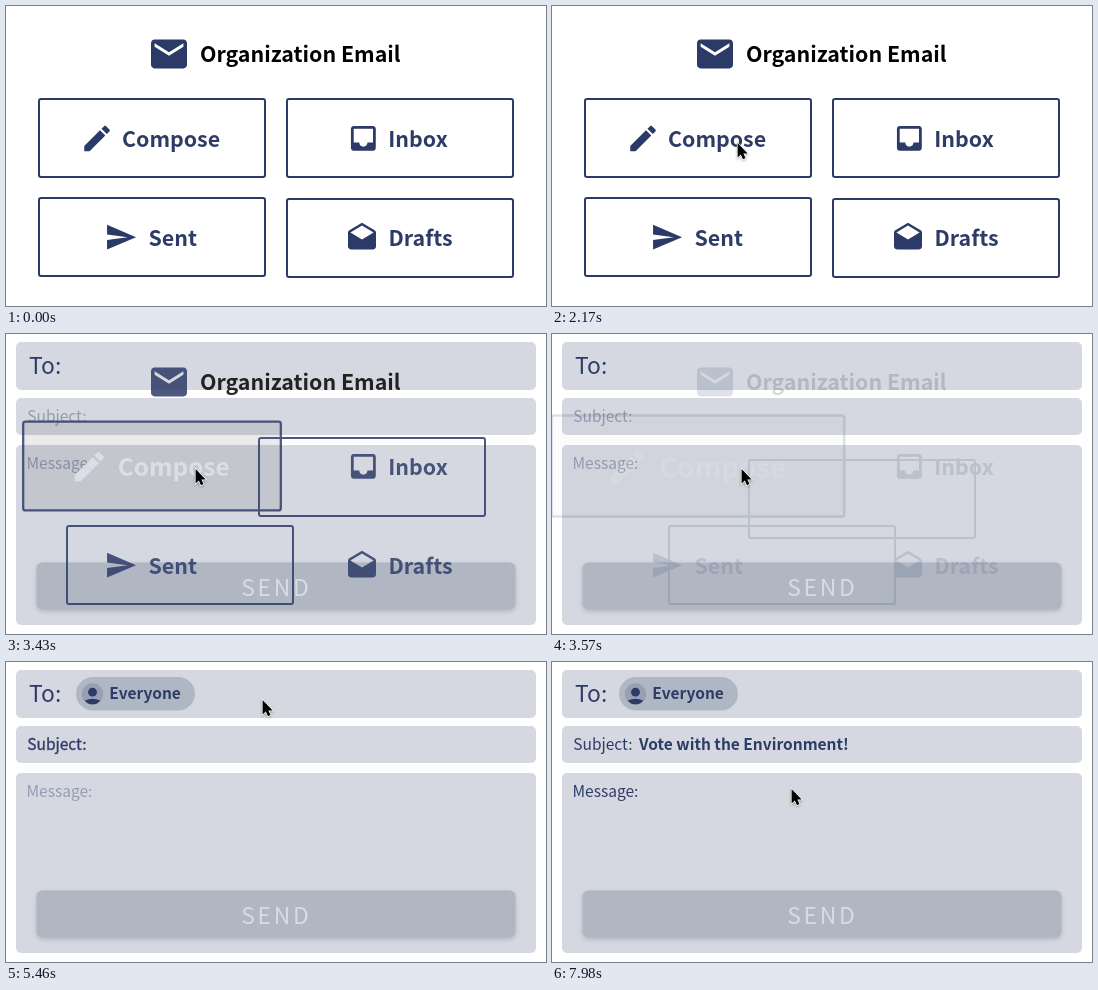
Recreate the animation shown at these times as an HTML page. Size 540 px wide and 300 px high, loop 8 s.

```html
<!DOCTYPE html>
<html lang="en">
<head>
<meta charset="utf-8">
<title>Email animation</title>
<style>
html, body { margin: 0; width: 100%; height: 100%; overflow: hidden; background: #fff; }
svg { display: block; width: 540px; height: 300px; }
text { font: 15.5px "Noto Sans CJK JP", "Noto Sans CJK SC", "Noto Sans CJK", "Noto Sans", sans-serif; fill: #2d3b67; }
.bold { font-weight: 700; }
.label { font-size: 21.4px; font-weight: 700; }
.icon, .dark { fill: #2b3a66; }
.frame { fill: none; stroke: #2b3a66; stroke-width: 2; }
.panel { fill: #d5d8e0; }
.button { fill: #b0b7c3; filter: drop-shadow(0 2px 2px rgba(60, 70, 100, .22)); }
#subject, #message { stroke: #2d3b67; stroke-width: 0; }
#compose.active .frame { fill: rgba(0, 0, 0, .1); }
#compose.active :is(text, .icon) { fill: #dcdfe6; }
#cursor { paint-order: stroke; stroke: #fff; stroke-width: 1.5; filter: drop-shadow(0 1px 1px rgba(0, 0, 0, .3)); }
</style>
</head>
<body>
<svg viewBox="0 0 540 300">
  <g id="form">
    <rect class="panel" x="10" y="8" width="520" height="48" rx="5"/>
    <rect class="panel" x="10" y="64" width="520" height="37" rx="5"/>
    <rect class="panel" x="10" y="111" width="520" height="180" rx="5"/>
    <rect class="button" x="30.5" y="228.5" width="479" height="47" rx="6"/>
    <text x="235.3" y="262" style="font-size:23px;font-weight:500;letter-spacing:2.6px;fill:#d8dbe3">SEND</text>
    <text x="23" y="39.5" style="font-size:22.9px">To:</text>
    <text id="subject" x="21.3" y="88">Subject:</text>
    <text id="message" x="20.5" y="135">Message:</text>
    <g id="pill">
      <rect x="67" y="15" width="119" height="33.5" rx="16.75" fill="#b0b7c4"/>
      <circle cx="83.5" cy="32" r="10.7" fill="#979fb3"/>
      <circle class="dark" cx="83.5" cy="30.2" r="4.4"/>
      <path class="dark" d="M75.8 38.4Q83.5 35 91.2 38.4Q88.5 42.3 83.5 42.3T75.8 38.4Z"/>
      <text class="bold" x="100.3" y="37">Everyone</text>
    </g>
    <text id="topic" class="bold" x="87" y="88">Vote with the Environment!</text>
  </g>
  <g id="home">
    <path class="icon" transform="translate(141.4 26.4) scale(1.8)" d="M20 4H4c-1.1 0-1.99.9-1.99 2L2 18c0 1.1.9 2 2 2h16c1.1 0 2-.9 2-2V6c0-1.1-.9-2-2-2zm0 4l-8 5-8-5V6l8 5 8-5v2z"/>
    <text class="label" x="194" y="56" style="fill:#000">Organization Email</text>
    <g id="compose">
      <rect class="frame" x="33" y="93" width="226" height="78" rx="2"/>
      <path class="icon" transform="translate(74 115.5) scale(1.42)" d="M3 17.25V21h3.75L17.81 9.94l-3.75-3.75L3 17.25zM20.71 7.04c.39-.39.39-1.02 0-1.41l-2.34-2.34c-.39-.39-1.02-.39-1.41 0l-1.83 1.83 3.75 3.75 1.83-1.83z"/>
      <text class="label" x="116" y="141">Compose</text>
    </g>
    <rect id="inboxFrame" class="frame" x="281" y="93" width="226" height="78" rx="2"/>
    <path class="icon" transform="translate(340.8 115.8) scale(1.38)" d="M19 3H5c-1.1 0-2 .9-2 2v14c0 1.1.9 2 2 2h14c1.1 0 2-.9 2-2V5c0-1.1-.9-2-2-2zm0 12h-4c0 1.66-1.35 3-3 3s-3-1.34-3-3H5V5h14v10z"/>
    <text class="label" x="382.3" y="141">Inbox</text>
    <rect id="sentFrame" class="frame" x="33" y="192" width="226" height="78" rx="2"/>
    <path class="icon" transform="translate(98.3 214.6) scale(1.38)" d="M2 21L23 12 2 3v7l15 2-15 2z"/>
    <text class="label" x="142.5" y="240">Sent</text>
    <rect id="draftsFrame" class="frame" x="281" y="193" width="226" height="78" rx="2"/>
    <path class="icon" transform="translate(339.2 215.4) scale(1.4)" d="M22 8c0-.72-.37-1.35-.94-1.7L12 1 2.95 6.3C2.38 6.65 2 7.28 2 8v10c0 1.1.9 2 2 2h16c1.1 0 2-.9 2-2zM12 13L3.74 7.84 12 3l8.26 4.84z"/>
    <text class="label" x="382.6" y="240">Drafts</text>
  </g>
  <path id="cursor" d="M.6 1V15.4L3.8 12.4 6 17.2 8.5 16.1 6.4 11.4H10.7Z"/>
</svg>
<script>
const LOOP = 8000, STEP = 70;
const $ = id => document.getElementById(id);
const set = (id, name, value) => $(id).setAttribute(name, value);
const show = (id, on) => set(id, "visibility", on ? "visible" : "hidden");
const clamp = v => Math.max(0, Math.min(1, v));
const progress = (t, from, to) => clamp((t - from) / (to - from));
const easeOut = (u, power) => 1 - (1 - u) ** power;

// Cursor moves: start, end, ease power, then start, control and end points
const moves = [
  [560, 2170, 1.77, [168, -16], [87, 22], [185, 136]],
  [3080, 3430, 1.2, [185, 136], [187, 134], [189, 134]],
  [3710, 4760, 2, [189, 134], [250, 79], [256, 37]],
  [5670, 6720, 1.4, [256, 37], [250, 60], [245, 86]],
  [7420, 7980, 1.4, [245, 86], [243, 106], [239, 126]]
];

function cursorAt(t) {
  const [from, to, power, a, b, c] = moves.findLast(m => t >= m[0]) || moves[0];
  const s = easeOut(progress(t, from, to), power), r = 1 - s;
  return a.map((v, i) => r * r * v + 2 * r * s * b[i] + s * s * c[i]);
}

// Enters from the right and settles in place
function slideIn(id, t, from, to) {
  const u = progress(t, from, to);
  set(id, "transform", `translate(${571 * (1 - u) ** 3.26} 0)`);
  set(id, "opacity", clamp(u * 2));
  show(id, u > 0);
}

function draw(t) {
  const leave = Math.max(0, (t - 3360) / STEP);
  const fade = clamp(leave / 4);
  show("form", leave > 0);
  set("home", "opacity", 1 - fade * fade * (3 - 2 * fade));
  $("compose").classList.toggle("active", leave > 0);
  set("compose", "transform", `translate(146 132) scale(${1 + .14 * Math.min(leave, 2.1)}) translate(-146 -132)`);
  set("inboxFrame", "transform", `translate(${-28 * leave} ${11 * leave})`);
  set("sentFrame", "transform", `translate(${28 * leave} 0)`);
  set("draftsFrame", "opacity", leave > 0 ? 0 : 1);

  slideIn("pill", t, 5180, 5530);
  slideIn("topic", t, 6790, 7210);
  const subject = progress(t, 5180, 5390), message = progress(t, 6790, 7000);
  set("subject", "opacity", .38 + .62 * subject);
  $("subject").style.strokeWidth = .3 * subject * (1 - message);
  set("message", "opacity", .38 + .62 * message);

  set("cursor", "transform", `translate(${cursorAt(t)})`);
  show("cursor", t >= 630);
}

const start = performance.now();
function tick() {
  const t = (performance.now() - start) % LOOP;
  draw(Math.floor(t / STEP) * STEP);
  requestAnimationFrame(tick);
}
tick();
</script>
</body>
</html>
```
